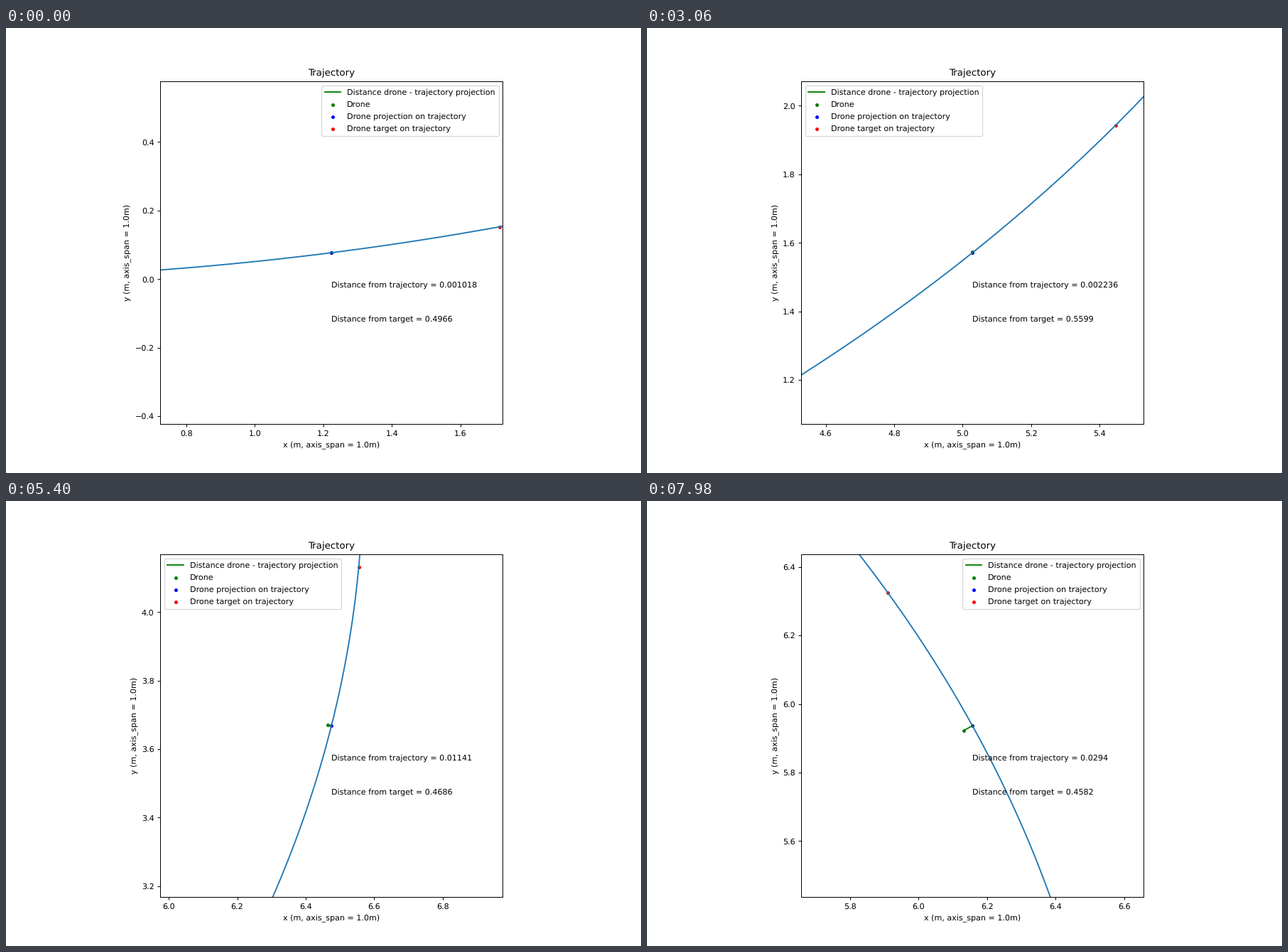
Write a matplotlib script that moves like this. It is 894 px wide and 626 px high and loops after 8000 ms.

```python
import numpy as np
import matplotlib.pyplot as plt
from matplotlib.animation import FuncAnimation

WIDTH, HEIGHT, DPI = 894, 626, 89.4
TICK, STEP, LOOP = 20, 60, 8000
LAST = LOOP // STEP       # the picture changes once per step
A, B = 6.5675, 4.404      # half axes of the elliptic trajectory
SPAN = 1.0

plt.rcParams.update({"font.size": 9, "text.hinting": "none"})


def point(angle):
    return np.array([A * np.sin(angle), B * (1 - np.cos(angle))])


def tangent(angle):
    return np.array([A * np.cos(angle), B * np.sin(angle)])


def proj_angle(u):
    """Angle reached on the ellipse: a quick start that slowly eases off."""
    return np.polyval([0.4825, -1.755068, 3.167238, -3.460551,
                       1.873176, 1.431536, 0.18739], u)


def goal_distance(u):
    """The target first pulls away, then the drone catches up."""
    return np.polyval([-3.198, 11.689135, -17.759484, 14.962054,
                       -7.253832, 1.521725, 0.4966], u)


def drone_offset(u):
    """Drift off the trajectory, growing with a wobble."""
    wobble = 0.003 + 0.016 * np.cos(21 * (u - 0.545))
    return 0.001018 + 0.02838 * u * u + u * (1 - u) * wobble


def goal_angle(start, drone, distance):
    """Angle ahead of start whose point lies at the distance from the drone."""
    angle = start + 0.1
    for _ in range(6):
        miss = distance - np.hypot(*(point(angle) - drone))
        angle += miss / np.hypot(*tangent(angle))
    return angle


fig, ax = plt.subplots(figsize=(WIDTH / DPI, HEIGHT / DPI), dpi=DPI)
ax.set_aspect("equal")
ax.set_title("Trajectory")
ax.set_xlabel(f"x (m, axis_span = {SPAN}m)")
ax.set_ylabel(f"y (m, axis_span = {SPAN}m)")

ax.plot(*point(np.linspace(0, np.pi, 400)))
link, = ax.plot([], [], color="g", label="Distance drone - trajectory projection")


def dot(color, label):
    return ax.scatter([0], [0], marker=".", color=color, label=label)


drone_dot = dot("g", "Drone")
proj_dot = dot("b", "Drone projection on trajectory")
goal_dot = dot("r", "Drone target on trajectory")
offset_text = ax.text(0, 0, "")
goal_text = ax.text(0, 0, "")
ax.legend(loc="best", labelspacing=0.57, borderpad=0.42)


def update(frame):
    u = frame * TICK // STEP / LAST
    angle, offset, distance = proj_angle(u), drone_offset(u), goal_distance(u)
    x, y = proj = point(angle)
    tx, ty = tangent(angle)
    drone = proj + offset * np.array([-ty, tx]) / np.hypot(tx, ty)

    link.set_data([drone[0], x], [drone[1], y])
    drone_dot.set_offsets([drone])
    proj_dot.set_offsets([proj])
    goal_dot.set_offsets([point(goal_angle(angle, drone, distance))])

    offset_text.set_position((x, y - 0.1))
    offset_text.set_text(f"Distance from trajectory = {offset:.4g}")
    goal_text.set_position((x, y - 0.2))
    goal_text.set_text(f"Distance from target = {distance:.4g}")

    ax.set_xlim(x - SPAN / 2, x + SPAN / 2)
    ax.set_ylim(y - SPAN / 2, y + SPAN / 2)
    return link, drone_dot, proj_dot, goal_dot, offset_text, goal_text


anim = FuncAnimation(fig, update, frames=LOOP // TICK, interval=TICK,
                     init_func=lambda: update(0), repeat=True, repeat_delay=0)
plt.show()
```
